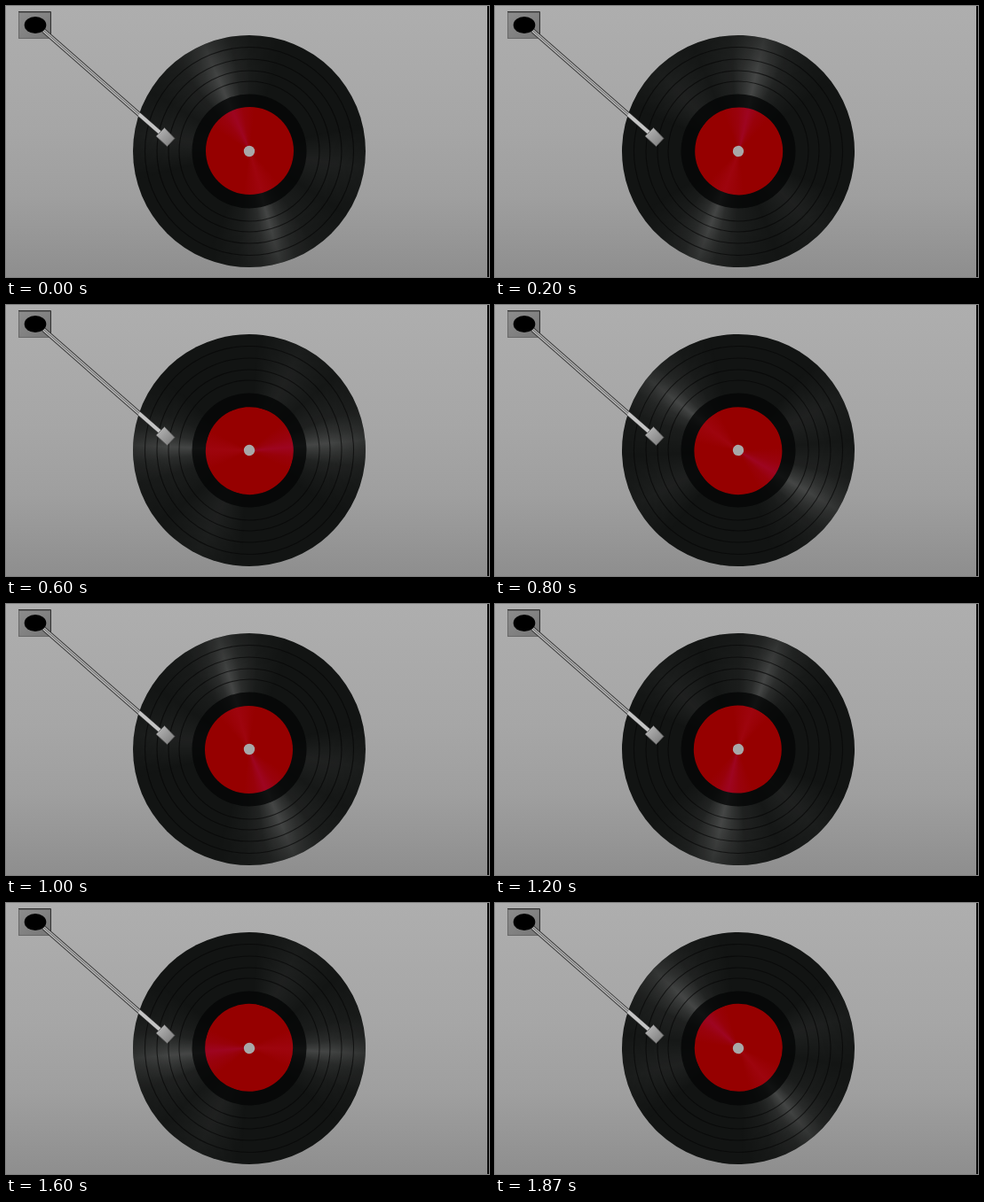
Write an HTML page that moves like this. It is 544x306 px and loops after 1940 ms.

```html
<!DOCTYPE html>
<html lang="en">
<head>
<meta charset="utf-8">
<title>Spinning record</title>
<style>
  html, body { margin: 0; width: 100%; height: 100%; overflow: hidden; }
  body { position: relative; background: linear-gradient(#aeaeae, #a6a6a6 45%, #9f9f9f 70%, #8e8e8e); }
  .edge { position: absolute; left: 542px; top: 0; width: 2px; height: 100%; background: #0a0a0a; }
  .disc, .disc div { position: absolute; border-radius: 50%; }
  .disc { left: 143px; top: 32.5px; width: 262px; height: 262px; background: #121413; }
  .disc div { inset: 0; }
  /* Two bright beams and two faint ones, fading towards the rim */
  .shine {
    background: conic-gradient(from -23deg,
      rgba(255,255,255,.215), rgba(255,255,255,.15) 6deg, rgba(255,255,255,.07) 14deg,
      rgba(255,255,255,.03) 24deg, transparent 42deg,
      transparent 98deg, rgba(255,255,255,.055) 121deg, rgba(255,255,255,.01) 146deg,
      rgba(255,255,255,.04) 168deg, rgba(255,255,255,.1) 179deg,
      rgba(255,255,255,.21) 187.5deg, rgba(255,255,255,.1) 196deg,
      rgba(255,255,255,.035) 208deg, transparent 226deg,
      transparent 278deg, rgba(255,255,255,.06) 302deg, rgba(255,255,255,.02) 324deg,
      rgba(255,255,255,.06) 343deg, rgba(255,255,255,.14) 353deg, rgba(255,255,255,.215));
    -webkit-mask-image: radial-gradient(circle closest-side, #000 68%, rgba(0,0,0,.6));
    mask-image: radial-gradient(circle closest-side, #000 68%, rgba(0,0,0,.6));
  }
  .disc .label {
    inset: 81.5px;
    background:
      conic-gradient(from -23deg,
        rgba(165,10,65,.5), rgba(165,10,65,.15) 14deg, transparent 30deg,
        transparent 160deg, rgba(175,15,45,.3) 187deg, transparent 212deg,
        transparent 325deg, rgba(165,10,65,.2) 345deg, rgba(165,10,65,.5)),
      #960000;
  }
  svg { position: absolute; left: 0; top: 0; }
</style>
</head>
<body>
<div class="edge"></div>
<div class="disc" id="disc">
  <div class="shine"></div>
  <svg width="262" height="262" fill="none">
    <g stroke="#050606" stroke-opacity=".65" stroke-width="1.1">
      <circle cx="131" cy="131" r="79"/>
      <circle cx="131" cy="131" r="91"/>
      <circle cx="131" cy="131" r="104"/>
      <circle cx="131" cy="131" r="117.5"/>
    </g>
    <circle cx="131" cy="131" r="64.5" fill="#040505" fill-opacity=".8"/>
  </svg>
  <div class="label"></div>
  <svg width="262" height="262"><circle cx="131" cy="131" r="6.2" fill="#a8a8a8"/></svg>
</div>
<svg width="544" height="306">
  <defs>
    <linearGradient id="plate" x1="0" y1="0" x2="1" y2="1">
      <stop offset="0" stop-color="#8c8c8c"/>
      <stop offset="1" stop-color="#777"/>
    </linearGradient>
    <linearGradient id="head" x1="0" y1="0" x2="1" y2="1">
      <stop offset="0" stop-color="#bcbcbc"/>
      <stop offset="1" stop-color="#777"/>
    </linearGradient>
  </defs>
  <rect x="14.5" y="7.5" width="35.5" height="29" fill="url(#plate)" stroke="#686868"/>
  <path d="M14 6.5H50.5V37" fill="none" stroke="#333"/>
  <path d="M42 27.5L174 143.5" stroke="#353535" stroke-width="5.4"/>
  <path d="M42 27.5L174 143.5" stroke="#b3b3b3" stroke-width="3.6"/>
  <path d="M42 27.3L152 124" stroke="#555" stroke-width=".8"/>
  <path d="M150 122.4L174 143.5" stroke="#c4c4c4" stroke-width="4"/>
  <ellipse cx="33" cy="21.5" rx="12.3" ry="9.6"/>
  <path d="M178.5 137.5L190 149.5L181.5 158.5L169 147Z" fill="url(#head)" stroke="#555" stroke-width=".8"/>
</svg>
<script>
  const LOOP = 1940, STEP = 12, LAST = 28;
  const disc = document.getElementById('disc');

  // Three hard steps in every 200 ms: at 0, 70 and 130
  function stepAt(t) {
    const part = t % 200;
    const n = 3 * Math.floor(t / 200) + (part >= 70) + (part >= 130);
    return Math.min(n, LAST);
  }

  function draw() {
    const t = performance.now() % LOOP;
    disc.style.transform = `rotate(${stepAt(t) * STEP}deg)`;
    requestAnimationFrame(draw);
  }
  draw();
</script>
</body>
</html>
```
